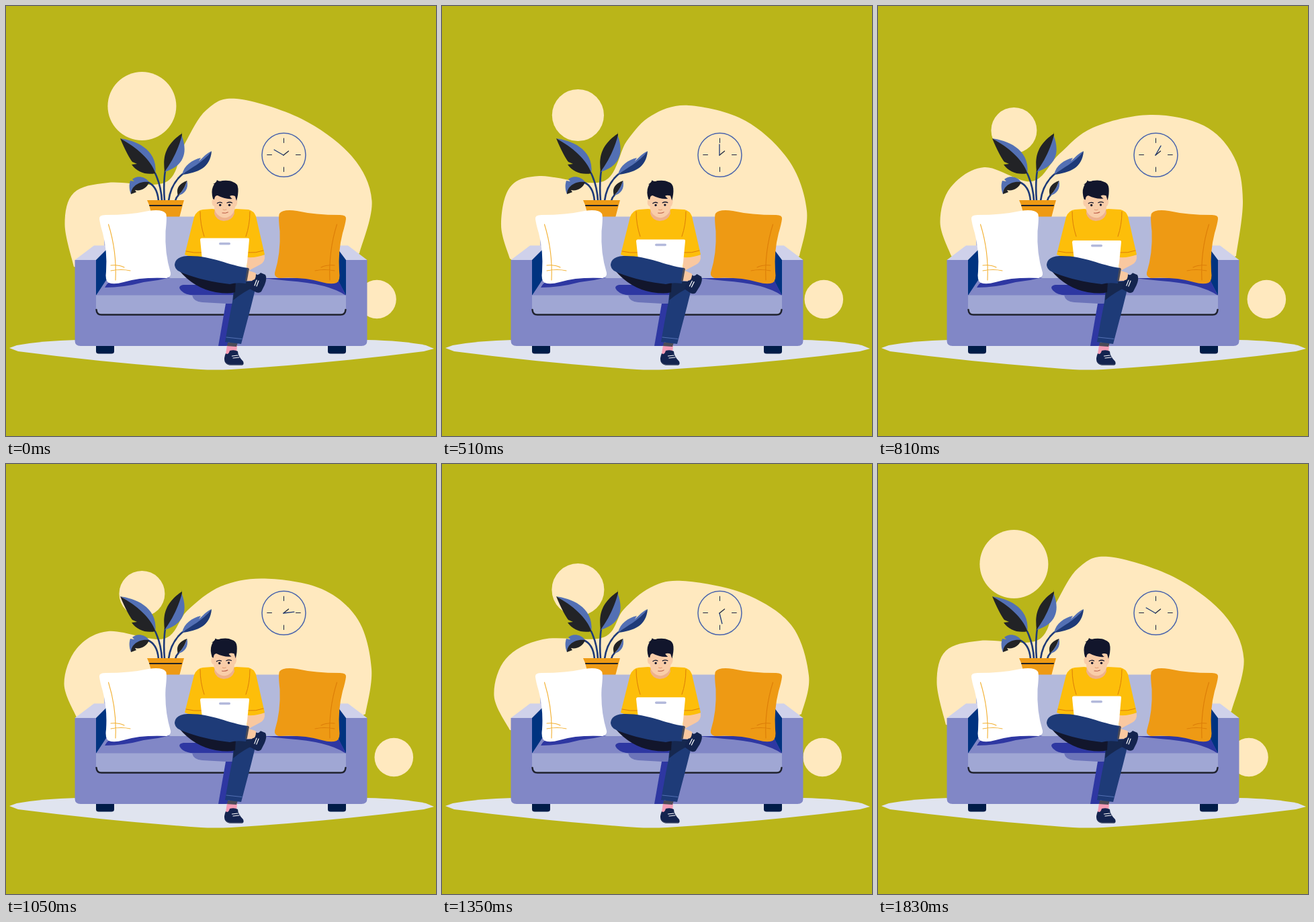
Animation, 640 px wide and 640 px high, one loop 1860 ms. Source, as an HTML page:

```html
<!DOCTYPE html>
<html lang="en">
<head>
<meta charset="utf-8">
<title>Working from the sofa</title>
<style>
html, body { margin: 0; width: 100%; height: 100%; overflow: hidden; background: #bab519; }
svg { display: block; width: 100vw; height: 100vh; }
.line { fill: none; stroke-linecap: round; }
</style>
</head>
<body>
<svg viewBox="0 0 640 640">
  <g fill="#ffe9bf">
    <path id="blob"/>
    <circle id="sun" cx="202.4"/>
    <circle id="ball" cy="436.5" r="28.8"/>
  </g>

  <g id="clock" class="line" stroke="#1c2440" stroke-width="1">
    <circle cx="413.5" cy="221.8" r="32.5" stroke="#4a64ac" stroke-width="1.5"/>
    <path d="M413.5 197V203.5M413.5 240V246.5M388.7 221.5H395.5M431.5 221.5H438.3"/>
    <path d="M413 222L420.5 216" stroke-width="1.3"/>
    <path id="hand" d="M413 222V206" stroke="#1e3a78" stroke-width="1.3"/>
  </g>

  <path id="floor" fill="#e0e4ef" d="M5 509L16 505Q55 498 105 497H537Q590 498 625 505L637 510L622 514Q480 532 335 541Q310 542 290 541Q150 531 18 514Z"/>

  <g id="plant">
    <g class="line" stroke="#1e3a78" stroke-width="2.6">
      <path d="M227 290Q225 267 210 262M232 290Q231 268 222 249M236 290Q234 265 237 245M242 290Q245 265 263 250M252 290Q253 285 257 281"/>
    </g>
    <path fill="#5370b4" d="M170 197C190 200 226 211 222.500 249C213 231 196 213 170 197Z"/>
    <path fill="#222326" d="M170 197C177 214 184 227 188 232L195 235L187 236C195 247 208 252 222.500 249C215 228 195 211 170 197Z"/>
    <path fill="#5370b4" d="M261 191C271 217 266 238 236 247C246 230 254 210 261 191Z"/>
    <path fill="#222326" d="M261.500 187L262 192C257 212 248 230 236 247C234 228 234 209 261.500 190Z"/>
    <path fill="#5370b4" d="M306 216C292 235 276 241 262 251C265 237 277 229 290 226L287 231C294 225 297 220 306 216Z"/>
    <path fill="#1e3a78" d="M306 216C304 241 286 248 262 251C276 240 292 234 306 216Z"/>
    <path fill="#5370b4" d="M213 262C207 253 194 252 188 258L191 261L185 260C183 266 183 273 186 280C188 268 199 261 213 262Z"/>
    <path fill="#222326" d="M213 262C210 271 201 276 192 274L194 277L186 280C186 268 199 260 213 262Z"/>
    <path fill="#222326" d="M269.500 260C256 265 253 273 256 282C263 276 267 268 269.500 260Z"/>
    <path fill="#5370b4" d="M269.500 260C272 272 266 280 256 282C263 276 267 268 269.500 260Z"/>
    <path fill="#ee9a14" d="M210 289H265L263 296L258 315H218L213 296Z"/>
    <path fill="#222326" d="M213 296H262L261.500 298H213.500Z"/>
  </g>

  <g id="sofa">
    <path fill="#b3b9db" d="M146 313.500H496V410H146Z"/>
    <path fill="#cfd1ea" d="M102.500 378L131 356.500H150V364L134 378ZM537.500 378L509 356.500H490V364L506 378Z"/>
    <path fill="#8187c6" d="M102.500 378H134V405H506V378H537.500V498Q537.500 506 529 506H111Q102.500 506 102.500 498Z"/>
    <path fill="#003380" d="M134 378L150 362V408L134 431ZM506 378L494 362V408L506 431Z"/>
    <path fill="#8187c6" d="M134 431L151 405H490L506 431Z"/>
    <path fill="#2e37a2" d="M147 419Q152 408 168 406L245 404Q225 409 205 411Q175 419 147 419ZM381 405H488L496 411L506 431Q480 413 420 409Z"/>
    <path fill="#a0a7d4" d="M134 430.500H506V452Q506 459 499 459H141Q134 459 134 452Z"/>
    <path class="line" stroke="#20232f" stroke-width="2.500" d="M134.500 452Q135 459.500 142 459.500H498Q505 459.500 505.500 452"/>
    <path fill="#001c48" d="M134 506H161V514Q161 517.500 157 517.500H138Q134 517.500 134 514ZM479 506H506V514Q506 517.500 502 517.500H483Q479 517.500 479 514Z"/>
    <path fill="#2e37a2" d="M264 415Q254 417 261 424Q267 430 280 430.500H342V415Z"/>
    <path fill="#6c74b9" d="M277 430.500Q279 440 292 441L328 443H342V430.500Z"/>
    <path fill="#2e37a2" d="M327 443H340L330 506H316Z"/>
  </g>

  <g id="pillows" stroke-width="1.100">
    <path fill="#fff" d="M139 317Q138 311 148 311Q185 311 212 305Q233 302 238 309Q240 313 237.500 335Q236 368 245 397Q246 403 239 405Q203 403 175 411Q161 415 153 412Q147 409 149 395Q151 365 144 338Q140 325 139 317Z"/>
    <path class="line" stroke="#f2b032" d="M152.500 325Q165 365 163 408M156 386Q168 385 176 389M156 394Q172 391 185 394"/>
    <path fill="#ee9a14" d="M506 317Q507 311 497 311Q460 311 433 305Q412 302 407 309Q405 313 407.500 335Q409 368 400 397Q399 403 406 405Q442 403 470 411Q484 415 492 412Q498 409 496 395Q494 365 501 338Q505 325 506 317Z"/>
    <path class="line" stroke="#dc7d08" d="M492.500 325Q480 365 482 408M489 386Q477 385 469 389M489 394Q473 391 460 394"/>
  </g>

  <g id="man">
    <path fill="#f9c8a0" d="M358 372L385 371Q386 381 378 385L361 394H350Z"/>
    <path fill="#fdbe0a" d="M307 302Q325 306 343 302L361 303Q369 305 372 313L385 370Q373 375 359 374V388H291V374Q277 375 266 370L280 314Q284 304 293 303Z"/>
    <path class="line" stroke="#dc7d08" d="M289 306Q289 325 295 343M363 306Q363 326 357 343M268 365Q280 368 291 367M360 367Q372 368 383 364"/>
    <path fill="#eeb18c" d="M311 299H339L340 309Q336 320 324 320Q313 319 310 309Z"/>
    <g id="head">
      <path fill="#f9cda8" d="M308 280H343V287Q345 288 344 294Q343 298 341 299Q340 310 331 314Q325 317 318 313Q310 308 310 298Q306 297 306.500 290L308 287Z"/>
      <path fill="#12162c" d="M308 287Q305 276 308 269L310 265L308 265Q313 263 314 259Q317 262 322 260Q333 259 338 262Q345 264 345.500 272Q346 280 343 290L341 283Q336 281 333 283Q335 286 337 287Q326 288 315 282Q311 281 310 288Z"/>
      <path class="line" stroke="#12162c" stroke-width="1.300" d="M314.500 293.500Q318 291 321.500 293M329 293Q333 291 336.500 293"/>
      <g fill="#12162c"><circle cx="318.700" cy="296.300" r="1.700"/><circle cx="332.500" cy="296.300" r="1.700"/></g>
      <path class="line" stroke="#e29a72" d="M323 303Q325 304.500 328 303"/>
      <path class="line" stroke="#b95843" d="M322 308Q327 309 330.500 307"/>
    </g>
    <path id="lid" fill="#fff"/>
    <rect id="badge" x="317" width="17" height="3.500" rx="1.700" fill="#b3b9db"/>

    <path fill="#f59db5" d="M329 505H344L343 518H327Z"/>
    <path fill="#4b4b57" d="M330 501H345L343 507L329 506Z"/>
    <path fill="#1e3b78" d="M340 412L373 409Q370 428 365 446L350 503L326 500Q331 470 337 440Z"/>
    <path fill="#162850" d="M340 411L373 409L371 418Q355 424 338 438Z"/>
    <path class="line" stroke="#5370b4" d="M328 493L351 495.500"/>
    <path fill="#14244f" d="M327 517Q331 520 333 513Q340 511 345 514Q345 521 353 529Q355 534 351 534.500H332Q327 533 325.500 529Q324 524 327 517Z"/>
    <path class="line" stroke="#46506b" d="M327 531Q330 534 334 534H352"/>
    <path class="line" stroke="#fff" stroke-width="1.200" d="M336.500 521L345 520M338 524L347 523"/>

    <path fill="#12162c" d="M258 394Q280 420 312 426Q332 429 341 426L342 411L300 398Z"/>
    <g id="foot">
      <path fill="#f9c8a0" d="M358 393L371 397L374 401L370 409H357Z"/>
      <path fill="#14244f" d="M372 399Q375 402 379 397L386 400Q389 405 385 415L380 425Q377 428 372 426L363 421Q364 414 367 408Q372 408 372 399Z"/>
      <path class="line" stroke="#fff" stroke-width="1.200" d="M373 408L370 416M376 409L373 417"/>
    </g>
    <path fill="#1e3b78" d="M251 385Q252 373 270 372C306 371 330 386 361 390L357 413Q343 411 333 414C305 411 270 402 256 394Q251 390 251 385Z"/>
    <path fill="#4b4b57" d="M359 390L362 391L358.500 410L356 409Z"/>
  </g>
</svg>

<script>
const LOOP = 1860, STEP = 30, END = 1830;
const TIMES = [0, 510, 810, 1050, 1350, 1590, END];
const $ = id => document.getElementById(id);
const set = (id, attrs) => Object.entries(attrs).forEach(([k, v]) => $(id).setAttribute(k, v));

// Outline of the backdrop at each key time, clockwise from lower left.
const OUTLINES = [
  "101,388 87.5,325 101,278 152,263 238,262 266,205 298,155 343,138 440,168 515,224 544.5,290 526,368",
  "101,376 88,326 101,270 145,253 240,261 275,201 312,163 367,148 452,171 517,231 543,305 532,372",
  "109,372 92.5,322 108,270 158,240 229,261 270,220 320,181 405,162 485,178 530,225 543,290 533,372",
  "105,377 86.5,327 105,275 152,249 235,260 270,218 320,182 385,170.5 470,186 524,232 544,305 535,372",
  "101,396 77.5,345 95,290 150,261 240,258 270,217 310,184 358,174 450,193 520,240 546,315 535,372",
  "99,387 85,333 100,280 150,261 240,260 268,210 305,165 357,151 440,171 517,230 543,305 529,368"
].map(s => s.split(/[ ,]/).map(Number));

// Smooth curve through cyclic key values, without overshoot.
function track(values) {
  const v = [...values, values[0]];
  const rate = TIMES.slice(1).map((t, i) => (v[i + 1] - v[i]) / (t - TIMES[i]));
  const slope = v.map((_, i) => {
    const a = rate[i - 1], b = rate[i];
    return a * b > 0 ? 2 * a * b / (a + b) : 0;
  });
  return time => {
    let i = 0;
    while (i < TIMES.length - 2 && time >= TIMES[i + 1]) i++;
    const d = TIMES[i + 1] - TIMES[i], u = (time - TIMES[i]) / d, w = 1 - u;
    return w * w * (1 + 2 * u) * v[i] + u * u * (1 + 2 * w) * v[i + 1]
      + d * u * w * (w * slope[i] - u * slope[i + 1]);
  };
}

function linear(time, values) {
  let i = 0;
  while (i < TIMES.length - 2 && time >= TIMES[i + 1]) i++;
  const u = (time - TIMES[i]) / (TIMES[i + 1] - TIMES[i]);
  return values[i] + (values[i + 1] - values[i]) * u;
}

const outline = OUTLINES[0].map((_, k) => track(OUTLINES.map(o => o[k])));
const sunY = track([149, 162.5, 185, 193, 187, 154]);
const sunR = track([51, 38.6, 34, 34, 39, 47]);
const footDrop = track([0, 1, 0.1, 0.1, 1, 0.9]);

function curve(c) {
  const n = c.length / 2;
  const at = i => { i = Math.max(0, Math.min(n - 1, i)); return [c[2 * i], c[2 * i + 1]]; };
  let d = "M" + at(0);
  for (let i = 0; i < n - 1; i++) {
    const [p, a, b, q] = [at(i - 1), at(i), at(i + 1), at(i + 2)];
    const out = a.map((x, k) => x + (b[k] - p[k]) / 6);
    const into = b.map((x, k) => x - (q[k] - a[k]) / 6);
    d += `C${out} ${into} ${b}`;
  }
  return d + "L480 400L140 400Z";
}

function draw(time) {
  const t = Math.min(END, time);
  const phase = t < 900 ? t / 900 : (END - t) / (END - 900);
  const sway = (1 - Math.cos(Math.PI * phase)) / 2;
  const drop = 3.5 * sway;
  const angle = linear(t, [-60, 0, 30, 83, 166, 235, 300]);

  set("blob", { d: curve(outline.map(f => f(t))) });
  set("sun", { cy: sunY(t), r: sunR(t) });
  set("ball", { cx: 552 + 27 * sway });
  set("hand", { transform: `rotate(${angle} 413 222)` });
  set("head", { transform: `rotate(${-2.3 * sway} 323 322)` });
  set("foot", { transform: `rotate(${6 * footDrop(t)} 360 402)` });
  set("lid", { d: `M289 ${348 + drop}Q289 ${345.5 + drop} 291 ${345.5 + drop}H360Q362.500 ${345.5 + drop} 362 ${348 + drop}L358 392L292 378Z` });
  set("badge", { y: 352 + drop * 0.85 });
}

function tick(now) {
  draw(Math.floor(now % LOOP / STEP) * STEP);
  requestAnimationFrame(tick);
}
draw(0);
requestAnimationFrame(tick);
</script>
</body>
</html>
```
